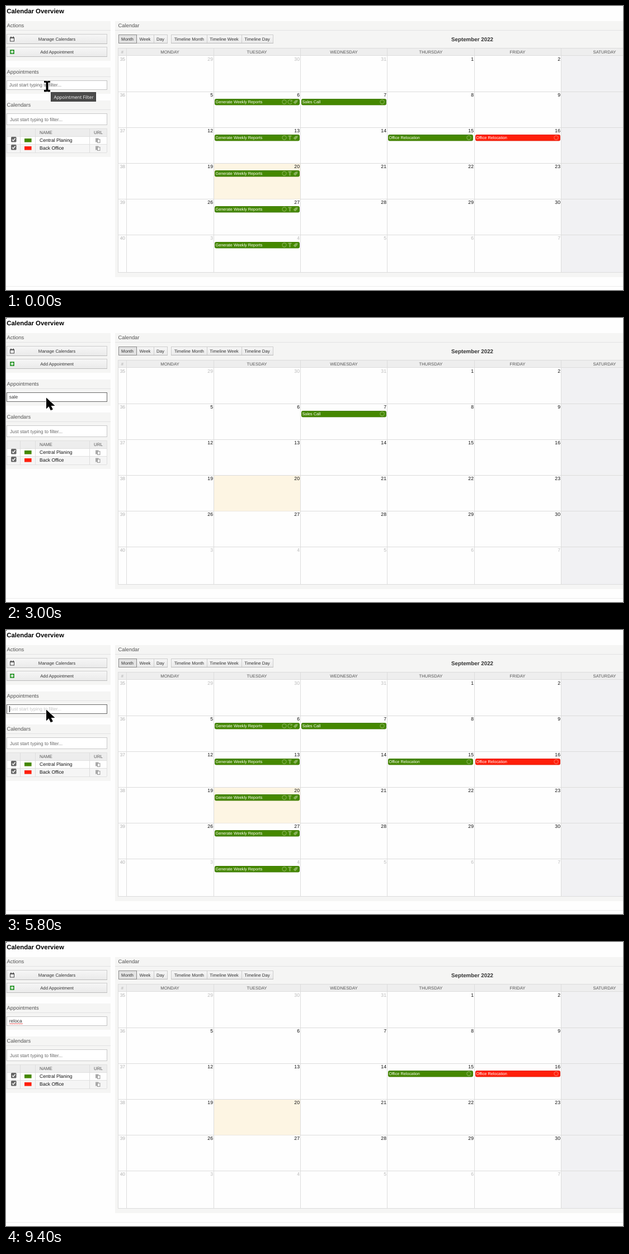
Recreate the animation shown at these times as an HTML page. Size 1103 by 508 pixels, loop 9.6 s.

```html
<!DOCTYPE html>
<html lang="en">
<head>
<meta charset="utf-8">
<title>Calendar Overview</title>
<style>
html, body { margin: 0; width: 100%; height: 100%; overflow: hidden; background: #fefefe; }
svg { display: block; font-family: "Liberation Sans", Arial, sans-serif; text-rendering: geometricPrecision; }
.ui { font-family: "Open Sans", sans-serif; }
</style>
</head>
<body>
<svg id="stage" width="1103" height="508" viewBox="0 0 1103 508">
  <defs>
    <linearGradient id="btn" x2="0" y2="1">
      <stop stop-color="#f6f6f6"/><stop offset="1" stop-color="#eaeaea"/>
    </linearGradient>
  </defs>
</svg>
<script>
const GREEN = '#458800', RED = '#ff1f0a', LINE = '#dcdcdc';
const stage = document.getElementById('stage');

function add(tag, attrs, parent = stage) {
  const node = document.createElementNS('http://www.w3.org/2000/svg', tag);
  for (const key in attrs) node.setAttribute(key, attrs[key]);
  return parent.appendChild(node);
}
const group = () => add('g', {});
const rect = (x, y, width, height, fill, extra, parent) =>
  add('rect', { x, y, width, height, fill, ...extra }, parent);
const path = (d, extra, parent) => add('path', { d, fill: 'none', ...extra }, parent);
const line = (d, stroke = LINE, parent) => path(d, { stroke }, parent);
function text(str, x, y, size, fill, extra, parent) {
  const node = add('text', { x, y, 'font-size': size, fill, ...extra }, parent);
  node.textContent = str;
  return node;
}
const middle = { 'text-anchor': 'middle' };
const bold = { 'font-weight': 700 };

function panel(x, y, w, h, title, divider) {
  rect(x, y, w, h, '#f5f5f4');
  line(`M${x} ${divider}.5h${w}`, '#e2e2e2');
  text(title, x ? 200.5 : 1.5, y + 11.1, 9.35, '#555');
}

function button(x, y, w, h, label, center, baseline, pressed) {
  rect(x + .5, y + .5, w, h, pressed ? '#e3e3e3' : 'url(#btn)', { stroke: pressed ? '#8a8a8a' : '#cdcdcd' });
  if (!pressed) line(`M${x} ${y + h + .5}h${w + 1}`, '#bbb');
  text(label, center, baseline, 7.85, '#333', middle);
}

function drawSidebar() {
  panel(0, 27, 187, 71, 'Actions', 43);
  button(1, 50, 179, 17, 'Manage Calendars', 91, 61.8);
  button(1, 73, 179, 17, 'Add Appointment', 91, 84.8);
  rect(7.5, 56.5, 7, 6.5, '#f8f8f8', { stroke: '#444' });
  path('M7 57h8M9 54.5v2M13 54.5v2', { stroke: '#444', 'stroke-width': 1.4 });
  rect(7, 78, 8, 8, '#3c9e3c', { rx: 1 });
  path('M11 79.5v5M8.5 82h5', { stroke: '#fff', 'stroke-width': 1.5 });

  panel(0, 110, 187, 47, 'Appointments', 126);
  panel(0, 169, 187, 101, 'Calendars', 185);
  rect(1.5, 192.5, 179, 20, '#fff', { stroke: '#c9c9c9' });
  text('Just start typing to filter...', 7, 205.6, 8.5, '#666');

  rect(1, 219, 179, 14, '#ededed');
  rect(1, 233, 179, 14, '#fefefe');
  rect(1, 247, 179, 15, '#f5f5f5');
  line('M1 219.5h179M1 233.5h179M1 247.5h179M1 262.5h179M1.5 219v43M180.5 219v43', '#e0e0e0');
  line('M25.5 219v43M52.5 219v43M149.5 219v43', '#dedede');
  text('NAME', 60, 229.3, 7.9, '#555');
  text('URL', 157, 229.3, 7.9, '#555');
  [['Central Planing', GREEN], ['Back Office', RED]].forEach(([name, color], i) => {
    const y = 234 + i * 14;
    rect(9, y, 9.5, 9.5, '#666', { rx: 1.5 });
    path(`M11 ${y + 5}l2 2 3.5-4.5`, { stroke: '#fff', 'stroke-width': 1.4 });
    rect(33, y + 3, 12.6, 6.6, color);
    text(name, 60, y + 9.2, 8.55, '#111');
    rect(160, y + 2.5, 5.5, 7, '#aaa');
    rect(163.5, y + 4.5, 4.5, 6, '#f4f4f4', { stroke: '#999' });
  });
}

const columns = [371, 526, 681, 837, 992];
const rowTop = row => 89 + row * 64;

function drawCalendar() {
  panel(195, 27, 908, 458, 'Calendar', 43);
  button(233, 51, 31, 15, 'Week', 248.5, 61.5);
  button(264, 51, 24, 15, 'Day', 276, 61.5);
  button(201, 51, 32, 15, 'Month', 217, 61.5, true);
  button(295, 51, 64, 15, 'Timeline Month', 327.3, 61.5);
  button(359, 51, 62, 15, 'Timeline Week', 390, 61.5);
  button(421, 51, 56, 15, 'Timeline Day', 449, 61.5);
  text('September 2022', 833.5, 63.3, 9.8, '#333', { ...middle, ...bold });

  rect(200, 75, 903, 402, '#fefefe');
  rect(200, 75, 903, 14, '#eee');
  rect(993, 89, 110, 388, '#f1f1f3');
  let grid = 'M200 75.5H1103M200 476.5H1103';
  for (let row = 0; row < 6; row++) grid += `M200 ${rowTop(row) + (row ? .5 : -.5)}H1103`;
  for (const x of [200, 215, ...columns]) grid += `M${x + .5} 75V477`;
  line(grid);
  rect(372, 282, 154, 63.5, '#fdf5e3');

  text('#', 208, 85, 7.75, '#aaa', middle);
  ['MONDAY', 'TUESDAY', 'WEDNESDAY', 'THURSDAY', 'FRIDAY', 'SATURDAY'].forEach((day, i) =>
    text(day, [293, 448.5, 604, 759.5, 914.5, 1070][i], 85, 7.75, '#555', middle));

  const start = Date.UTC(2022, 7, 29), dayMs = 864e5;
  for (let row = 0; row < 6; row++) {
    const y = rowTop(row) + 9;
    text(35 + row, 208.3, y, 8.4, '#b0b0b0', middle);
    columns.forEach((x, col) => {
      const date = new Date(start + (row * 7 + col) * dayMs);
      const fill = date.getUTCMonth() === 8 ? '#111' : '#bbb';
      text(date.getUTCDate(), x - 1, y, 8.7, fill, { 'text-anchor': 'end' });
    });
  }
  line('M0 501.5H1103', '#ececec');
}

function event(row, col, label, color, icons, parent) {
  const x = columns[col] + 2, y = rowTop(row) + 14;
  const tint = { stroke: '#fff', 'stroke-opacity': .35, 'stroke-width': 1.1 };
  rect(x + .5, y - .5, 151, 10.4, color, { rx: 2, stroke: color === RED ? '#e41c0a' : '#3f7c00' }, parent);
  text(label, x + 1.5, y + 7.4, 7.3, '#fff', {}, parent);
  [...icons].forEach((icon, i) => {
    const cx = x + 144.5 - (icons.length - 1 - i) * 10, cy = y + 4.5;
    if (icon === 'o') add('circle', { cx, cy, r: 3.6, fill: 'none', ...tint }, parent);
    if (icon === 'c') path(`M${cx + 3} ${cy - 2.3}a3.7 3.7 0 1 0 .5 4M${cx + 3.6} ${cy - 4}v3h-3`, tint, parent);
    if (icon === 't') path(`M${cx - 3} ${cy - 3}h6M${cx} ${cy - 3}v7`, { ...tint, 'stroke-width': 2.2 }, parent);
    if (icon === 'g') path(`M${cx - 4} ${cy + 1}l4-4 4-.5-.5 3.5-4 4z`, { fill: '#fff', 'fill-opacity': .35 }, parent);
  });
}

function drawEvents() {
  const sets = { sales: group(), reports: group(), office: group() };
  event(1, 1, 'Sales Call', GREEN, 'o', sets.sales);
  for (let row = 1; row < 6; row++)
    event(row, 0, 'Generate Weekly Reports', GREEN, row === 1 ? 'ocg' : 'otg', sets.reports);
  event(2, 2, 'Office Relocation', GREEN, 'o', sets.office);
  event(2, 3, 'Office Relocation', RED, 'o', sets.office);
  return sets;
}

text('Calendar Overview', 1.2, 13.3, 11.4, '#000', bold);
drawSidebar();
drawCalendar();
const events = drawEvents();
const titles = { sales: 'sales call', reports: 'generate weekly reports', office: 'office relocation' };

// Filter field and overlays
const field = rect(1.5, 133.5, 179, 16, '#fff');
const hint = text('Just start typing to filter...', 5.8, 144.3, 8.45, '#666');
const typed = text('', 5.8, 144.3, 8.45, '#333');
const caret = rect(6, 136, 1, 11, '#111');
const squiggle = path('M6 147' + 'l1.5-1.5 1.5 1.5'.repeat(8), { stroke: '#e03030', 'stroke-width': .9 });
const corner = rect(0, 0, 1.5, 1, '#222');

const tooltip = group();
rect(80.5, 154.5, 80, 16, '#4b4b4b', { stroke: '#3c3c3c' }, tooltip);
text('Appointment Filter', 85.5, 165.6, 8.15, '#fff', { class: 'ui' }, tooltip);

const beam = path('M68 134h4.5l1 1 1-1H79v3h-3.5v13H79v3.5h-4.5l-1-1-1 1H68v-3.5h3.5v-13H68z', { fill: '#000' });
const arrow = path('M72 142.5v20l4.5-4.2 3.4 7 4-1.8-3.3-6.6H87.5z',
  { fill: '#000', stroke: '#fff', 'stroke-width': 1.6, 'paint-order': 'stroke' });

const popup = group();
rect(28, 111, 180, 27, '#000', { rx: 5, opacity: .14 }, popup);
rect(29, 111, 178, 25, '#2b2b2b', { rx: 4.5 }, popup);
[['replica', 42.5], ['relocation', 91], ['relocating', 154]].forEach(([word, x]) =>
  text(word, x, 127.3, 9.4, '#fff', { class: 'ui' }, popup));

const keys = [
  [600, ''], [1800, 's'], [2000, 'sa'], [2100, 'sal'], [2400, 'sale'],
  [3200, 'sa'], [3400, 's'], [3600, ''],
  [6200, 'r'], [6400, 're'], [6600, 'rel'], [6800, 'relo'], [7000, 'reloc'], [7100, 'reloca']
];
const LOOP = 9600, STEP = 200, FOCUS = 600, BLUR = 9400, POPUP = 7200, POPUP_END = 9200;

const show = (node, on) => node.setAttribute('visibility', on ? 'visible' : 'hidden');

function render(t) {
  const [since, value] = keys.filter(([at]) => at <= t).pop() || [0, ''];
  const focused = t >= FOCUS && t < BLUR;
  typed.textContent = value;
  show(hint, !value);
  hint.setAttribute('fill', focused ? '#c6c6c6' : '#666');
  field.setAttribute('stroke', focused ? '#6a6a6a' : '#c4c4c4');
  caret.setAttribute('x', value ? 5.6 + typed.getComputedTextLength() : 6);
  show(caret, focused && Math.floor((t - since) / 500) % 2 === 0);
  for (const key in events) show(events[key], titles[key].includes(value));
  show(corner, t >= FOCUS);
  show(tooltip, t < FOCUS);
  show(beam, t < 2400);
  show(arrow, t >= 2400 && t < POPUP);
  show(popup, t >= POPUP && t < POPUP_END);
  show(squiggle, t >= POPUP);
}

const origin = performance.now();
let last = -1;
function tick() {
  const t = Math.floor(((performance.now() - origin) % LOOP) / STEP) * STEP;
  if (t !== last) render(last = t);
  requestAnimationFrame(tick);
}
tick();
</script>
</body>
</html>
```
